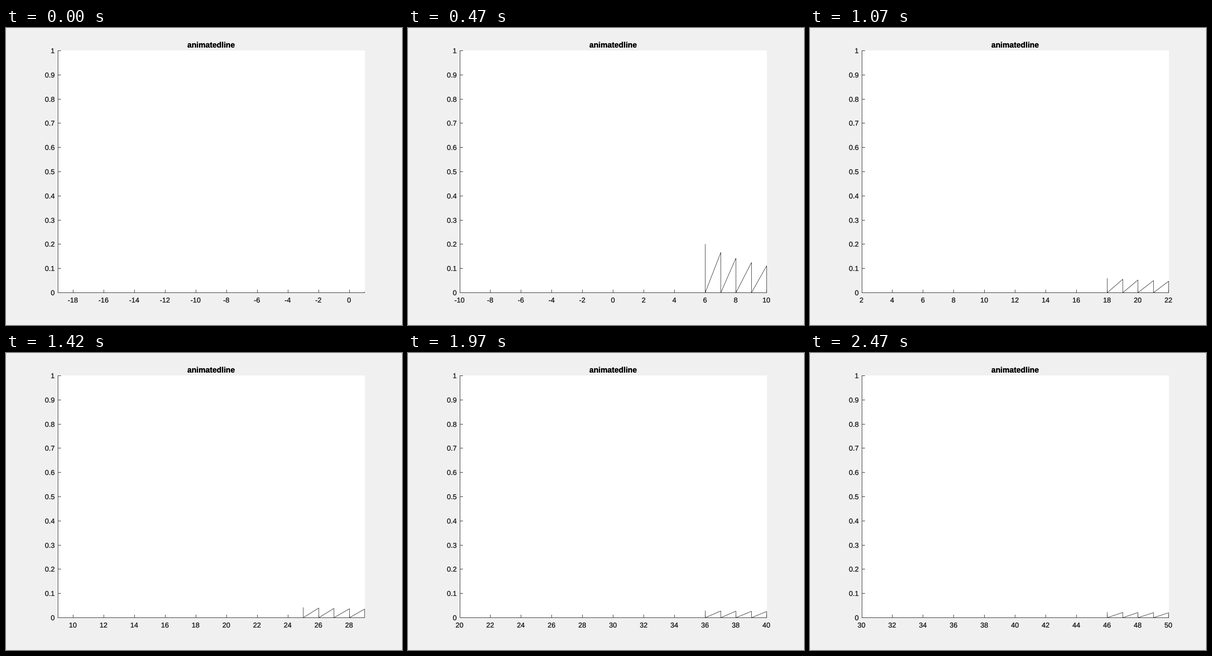
Animation, 864 px wide and 648 px high, one loop 2.52 s. Source, as a matplotlib script:

```python
import math

import matplotlib.pyplot as plt
from matplotlib.animation import FuncAnimation
from matplotlib.patches import Rectangle
from matplotlib.patheffects import withStroke

W, H, DPI = 864, 648, 100
PX = 72 / DPI                      # one pixel in points
LEFT, STEP = 113.02, 33.48         # left edge of the plot, pixels per x unit
BASE, HEIGHT = 577.5, 528          # row of y = 0, pixels per y unit
SPAN = 20                          # width of the scrolling window
TRAIL = 5                          # spikes kept on screen
INK = "#262626"

plt.rcParams["font.family"] = "Liberation Sans"
plt.rcParams["text.hinting"] = "none"

fig = plt.figure(figsize=(W / DPI, H / DPI), dpi=DPI, facecolor="#f0f0f0")
ax = fig.add_axes([0, 0, 1, 1])
ax.set_xlim(0, W)
ax.set_ylim(H, 0)
ax.axis("off")


def stroke(xs, ys, color=INK, width=1.0, z=2):
    line, = ax.plot(xs, ys, color=color, lw=width * PX, zorder=z, snap=False,
                    solid_capstyle="projecting", solid_joinstyle="bevel")
    return line


def label(x, y, text, size=15.43, color=INK, **kw):
    # a hairline outline gives the slightly heavier stems
    style = dict(ha="center", va="baseline", **kw) if "ha" not in kw else dict(va="baseline", **kw)
    outline = withStroke(linewidth=0.25 * PX, foreground=color)
    return ax.text(x, y, text, fontsize=size * PX, color=color,
                   path_effects=[outline], **style)


def pixel(v):
    """Centre of the pixel that holds v."""
    return math.floor(v) + 0.5


def offset(x, now):
    """Distance of x from the left edge while the window ends at now."""
    return STEP * (x - now + SPAN)


def row(y):
    return BASE - HEIGHT * y


def peak(x):
    # the first value is undefined and leaves only a dot on the axis
    return 1 / (x - 1) if x > 1 else 0.003


ax.add_patch(Rectangle((113, 49), 670, 529, color="white", lw=0, zorder=0))
label(447.6, 42.5, "animatedline", 16.97, color="black", weight="bold")

axis_x = pixel(LEFT)
stroke([axis_x, 782], [BASE, BASE])
stroke([axis_x, axis_x], [49.5, BASE])
for i in range(11):
    y = pixel(577.4 - 52.8 * i)
    stroke([axis_x, axis_x + 6], [y, y])
    label(106.2, y + 5.5, f"{i / 10:g}", ha="right")

ticks = [(stroke([0, 0], [BASE, 571.5]), label(0, 599, "")) for _ in range(11)]
curve = stroke([], [], "black", 0.78, 3)


def draw(i):
    # the first step lasts 70 ms, every later one 50 ms
    now = 1 if i < 7 else 2 + (i - 7) // 5

    first = now - SPAN + now % 2
    for n, (mark, text) in enumerate(ticks):
        value = first + 2 * n
        shown = value <= now
        mark.set_visible(shown)
        text.set_visible(shown)
        if shown:
            x = pixel(LEFT + offset(value, now))
            mark.set_xdata([x, x])
            text.set_x(112.3 + offset(value, now))
            text.set_text(str(value))

    xs, ys = [], []
    for x in range(max(1, now - TRAIL + 1), now + 1):
        xs += [pixel(LEFT + offset(x, now))] * 2
        ys += [row(peak(x)), row(0)]
    curve.set_data(xs, ys)
    return [curve]


anim = FuncAnimation(fig, draw, frames=252, interval=10, repeat=True,
                     repeat_delay=0, init_func=lambda: [curve],
                     cache_frame_data=False)
plt.show()
```
